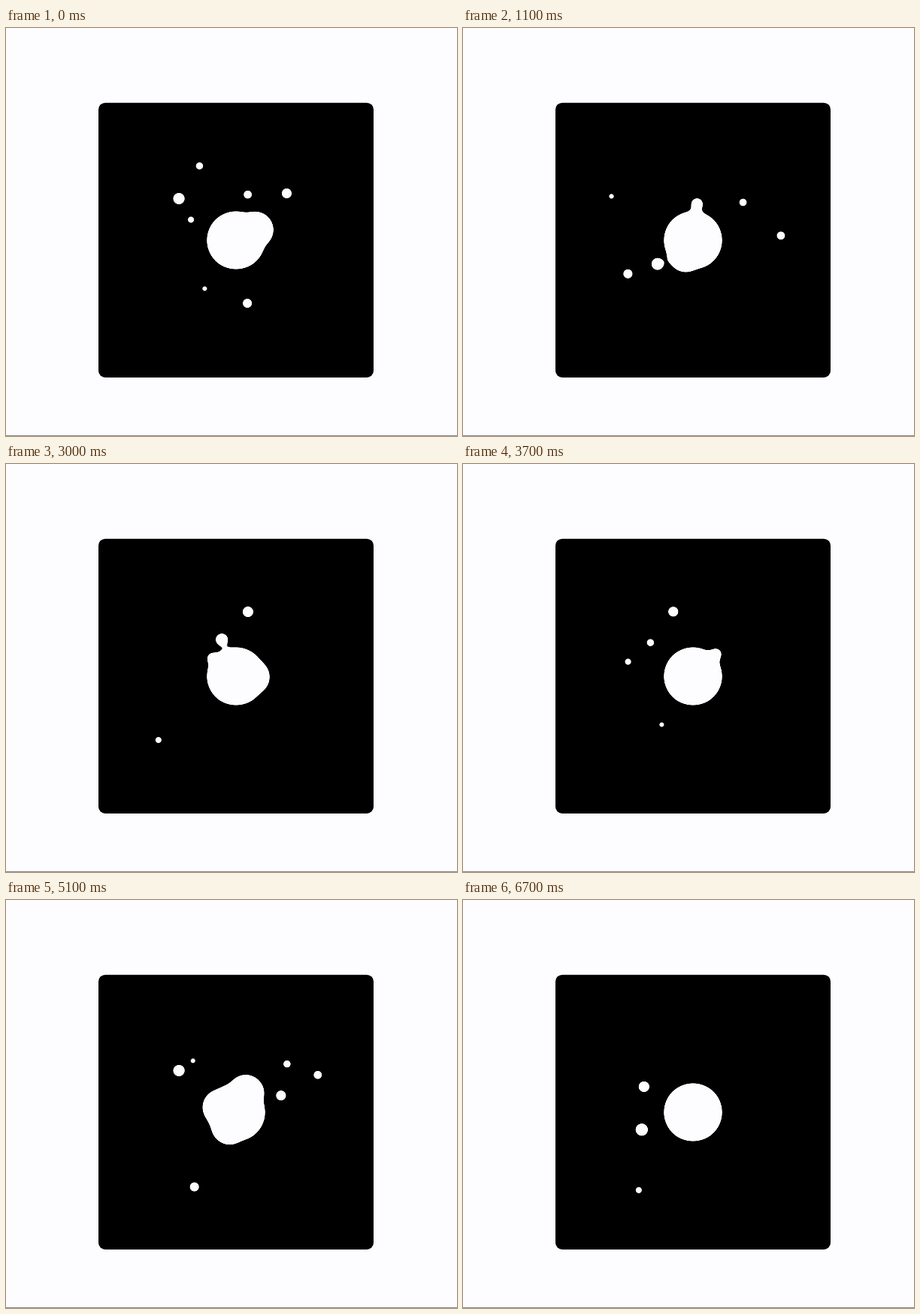
An HTML page for the animation above (6800 ms loop, 600 px wide and 544 px high).

```html
<!DOCTYPE html>
<html lang="en">
<head>
<meta charset="utf-8">
<title>Gooey orbit</title>
<style>
  html, body { margin: 0; width: 100%; height: 100%; overflow: hidden; background: #fdfcfe; }
  svg { display: block; width: 600px; height: 544px; }
</style>
</head>
<body>
<svg viewBox="0 0 600 544">
  <defs>
    <filter id="goo" filterUnits="userSpaceOnUse" x="123" y="100" width="366" height="366"
            color-interpolation-filters="sRGB">
      <feGaussianBlur stdDeviation="5"/>
      <feColorMatrix values="1 0 0 0 0  0 1 0 0 0  0 0 1 0 0  0 0 0 20 -9.5"/>
    </filter>
  </defs>
  <rect width="600" height="544" fill="#fdfcfe"/>
  <rect y="543" width="600" height="1" fill="#868588"/>
  <rect x="123" y="99.7" width="366" height="366.3" rx="9"/>
  <g id="blob" filter="url(#goo)" fill="#fdfcfe">
    <circle cx="306" cy="283" r="39.1"/>
  </g>
</svg>
<script>
const LOOP = 6800, STEP = 100;
const CENTER = { x: 306, y: 283 };
const blob = document.getElementById('blob');

// Every dot circles a pivot so that its path passes through the center.
// heading: direction of the pivot in degrees; elapsed: ms already travelled at the start
const outer = [
  [179.7, 1100], [144.1, 2805], [-86.2, 1645], [-17, 1245], [121.4, 1616],
  [-73.9, 2834], [250.7, 4832], [217.4, 2530], [195.7, 640]
].map(([heading, elapsed], i) => ({
  heading, elapsed,
  period: 3700 + 200 * i,
  reach: 70.3 - 3.32 * i,
  size: 6.1 + 0.42 * i
}));

const inner = [
  { heading: -45, elapsed: 1493, period: 2700, reach: 15, size: 25 },
  { heading: 198, elapsed: 2150, period: 2900, reach: 10.5, size: 25 },
  { heading: 108, elapsed: 1056, period: 4050, reach: 10.3, size: 25 }
];

const dots = [...outer, ...inner].map(dot => {
  const node = document.createElementNS('http://www.w3.org/2000/svg', 'circle');
  node.setAttribute('r', dot.size);
  blob.append(node);
  return { ...dot, node };
});

// cubic-bezier(.42, 0, .58, 1), solved by bisection
function easeInOut(x) {
  let low = 0, high = 1, u = 0.5;
  for (let i = 0; i < 24; i++) {
    u = (low + high) / 2;
    const bx = 1.26 * u * (1 - u) ** 2 + 1.74 * u * u * (1 - u) + u ** 3;
    if (bx < x) low = u; else high = u;
  }
  return u * u * (3 - 2 * u);
}

function draw(time) {
  for (const { heading, elapsed, period, reach, node } of dots) {
    const progress = ((elapsed + time) % period) / period;
    const pivot = heading * Math.PI / 180;
    const angle = pivot + Math.PI + 2 * Math.PI * easeInOut(progress);
    node.setAttribute('cx', CENTER.x + reach * (Math.cos(pivot) + Math.cos(angle)));
    node.setAttribute('cy', CENTER.y + reach * (Math.sin(pivot) + Math.sin(angle)));
  }
}

const start = performance.now();
function tick() {
  const time = (performance.now() - start + 8) % LOOP;
  draw(Math.floor(time / STEP) * STEP);
  requestAnimationFrame(tick);
}
tick();
</script>
</body>
</html>
```
